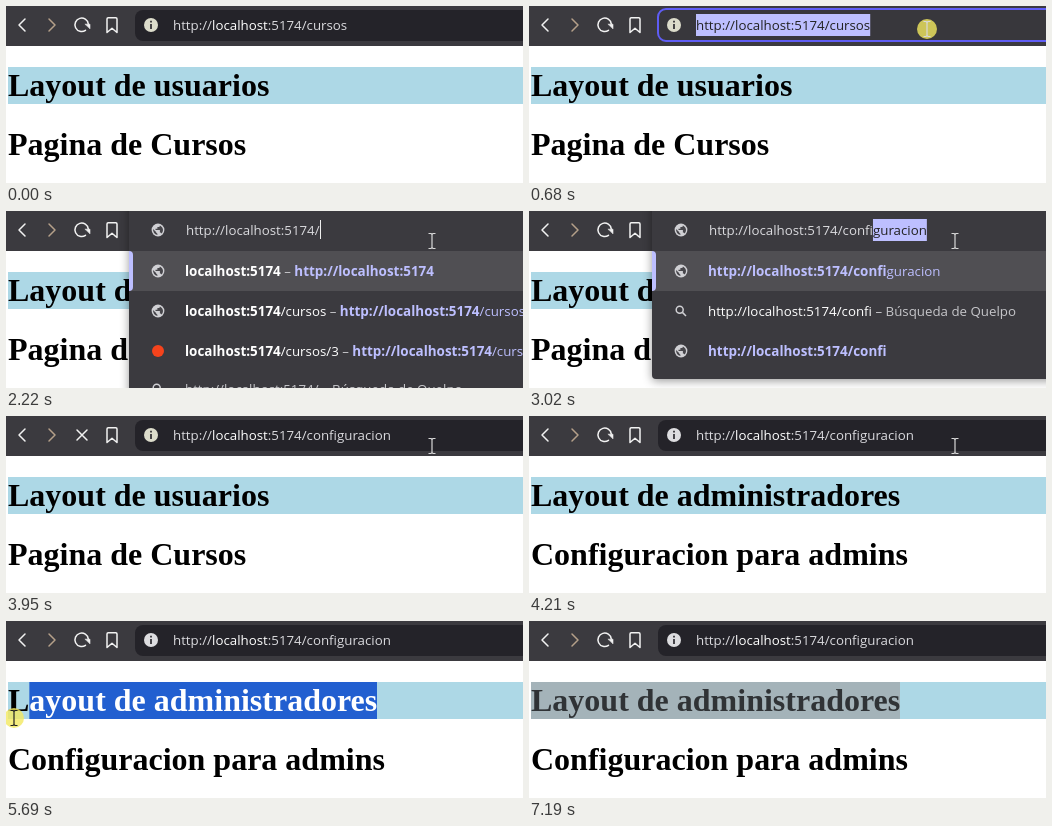
These frames come from a looping animation (517 px wide and 177 px high, 7.32 s). An HTML page:

```html
<!DOCTYPE html>
<html lang="es">
<head>
<meta charset="utf-8">
<title>Layouts por ruta</title>
<style>
  html, body { margin: 0; width: 100%; height: 100%; overflow: hidden; background: #fff; }
  svg { display: block; width: 100%; height: 100%; }
  text { white-space: pre; }
  .ui { font: 13.3px "Open Sans", "Noto Sans", sans-serif; fill: #c6c6ca; }
  .page { font: bold 32px "Liberation Serif", serif; fill: #000; }
  .bold { font-weight: 700; font-size: 13.45px; }
  .white { fill: #fff; }
  .link { fill: #bdbfff; }
  .line { fill: none; stroke: #f2f2f2; stroke-width: 1.5; stroke-linecap: round; stroke-linejoin: round; }
  #url { fill: #dadade; }
  #panel { filter: drop-shadow(0 2px 5px rgba(0, 0, 0, .4)); }
</style>
</head>
<body>
<svg viewBox="0 0 517 177">
  <defs>
    <clipPath id="selClip"><rect id="selClipBox" y="61" width="0" height="37"/></clipPath>
    <g id="globe">
      <circle r="6.4" fill="#d0d0d4"/>
      <path d="M-5 -1.100 L-1.900 1.900 V2.500 L-.6 3.800 V5 Q-5 4 -5 -1.100 Z M3.700 3.400 L2.500 2.500 H1.900 V0 H-2.500 V-1.300 H-.6 V-3.100 H.6 Q1.900 -3.100 1.900 -4.600 Q5 -3 5 0 Q5 2 3.700 3.400 Z" fill="#47464b"/>
    </g>
    <g id="lens" fill="none" stroke="#d0d0d4" stroke-width="1.5">
      <circle cx="-1.3" cy="-1.3" r="3.5"/><path d="M1.400 1.400 L5 5"/>
    </g>
    <circle id="dot" r="6" fill="#f5431c"/>
  </defs>

  <rect width="517" height="177" fill="#fff"/>
  <rect x="2" y="61" width="515" height="37" fill="#add8e6"/>
  <text id="title" class="page" x="2" y="90"></text>
  <rect id="sel" y="61" width="0" height="37"/>
  <text id="titleSel" class="page" x="2" y="90" clip-path="url(#selClip)"></text>
  <text id="heading" class="page" x="2" y="149"></text>

  <rect width="517" height="40" fill="#3b3a3f"/>
  <g class="line">
    <path d="M19 13 L13 19 L19 25"/>
    <path d="M43 13 L49 19 L43 25" stroke="#b5a08a"/>
    <g id="reload">
      <path d="M79.500 24.300 A6.700 6.700 0 1 1 82.300 18"/>
      <path d="M79.300 18.200 H84 V22.500 Z" fill="#f2f2f2" stroke-width=".6"/>
    </g>
    <path id="stop" d="M71 14 L81 24 M81 14 L71 24"/>
    <path d="M101 13 Q101 11.800 102.200 11.800 H109.800 Q111 11.800 111 13 V26.500 L106 22.300 L101 26.500 Z"/>
  </g>
  <rect id="field" x="129" width="400" rx="8"/>

  <g id="panel">
    <rect id="sheet" x="123" y="-10" width="410" rx="4" fill="#3b3a3f"/>
    <rect x="123" y="40" width="410" height="40" fill="#504f53"/>
    <path d="M123 40 Q127 40 127 44 V76 Q127 80 123 80 Z" fill="#bdbfff"/>
    <g id="rows"></g>
    <use href="#globe" x="152" y="19"/>
  </g>

  <g id="info">
    <circle id="infoDisc" cx="145" cy="19" r="7"/>
    <path d="M145 18 V23 M145 14.800 V16.400" stroke="#2b2a2e" stroke-width="1.7"/>
  </g>
  <rect id="mark" y="8" height="22" fill="#bdbfff"/>
  <text id="url" class="ui" y="24"><tspan id="scheme">http://</tspan><tspan id="host">localhost</tspan><tspan id="path"></tspan><tspan id="fill" fill="#222"></tspan></text>
  <rect id="caret" y="9" width="1" height="19" fill="#eee"/>

  <g id="cursor">
    <circle id="halo" r="10" fill="#f3e95f" fill-opacity=".8"/>
    <path id="beam" d="M-3.500 -7.500 H-1 L0 -6.500 L1 -7.500 H3.500 M0 -6.500 V6.500 M-3.500 7.500 H-1 L0 6.500 L1 7.500 H3.500" fill="none" stroke-width="1.2"/>
    <path id="arrow" d="M0 0 V16 L3.700 12.500 L6.200 18.200 L8.600 17.100 L6.100 11.600 H11.300 Z" fill="#fff" stroke="#000"/>
  </g>
</svg>
<script>
const LOOP = 7320, BASE = 'http://localhost:5174/';
const ui = Object.fromEntries([...document.querySelectorAll('svg [id]')].map(el => [el.id, el]));
const set = (el, attrs) => { for (const key in attrs) el.setAttribute(key, attrs[key]); };
const show = (el, on) => { el.style.display = on ? '' : 'none'; };
const write = (el, text) => { if (el.textContent !== text) el.textContent = text; };
const within = (t, from, to) => t >= from && t < to;

const typing = [[0, 'cursos'], [2140, ''], [2490, 'c'], [2620, 'co'], [2760, 'con'],
  [2890, 'conf'], [3020, 'confi'], [3620, 'configuracion']];

// start, end, steps, from, to: the pointer is sampled, so it moves in hops
const glides = [
  [70, 610, 8, [464, 166], [398, 23]],
  [740, 880, 2, [398, 23], [426, 30]],
  [4870, 5140, 4, [426, 30], [375, 96]],
  [5280, 5690, 6, [375, 96], [8, 97]],
  [5820, 6580, 11, [8, 97], [459, 164]]
];
const DRAG = glides[3];

function along([start, end, steps, a, b], t, lag = 0) {
  const hop = Math.floor((t - start) / (end - start) * steps + 0.01) - lag;
  const p = Math.max(0, Math.min(1, hop / steps));
  const eased = p * (2 - p);
  return a.map((v, i) => v + (b[i] - v) * eased);
}

const span = (cls, text) => `<tspan class="${cls}">${text}</tspan>`;
const dash = ' – ';

function suggestions(typed, rest) {
  const host = span('bold white', 'localhost:5174');
  const link = span('bold link', 'http://localhost:5174');
  const search = span('white', BASE + typed) + dash + 'Búsqueda de Quelpo';
  const page = path => host + span('white', path) + dash + link + span('link', path);
  if (!typed) return [
    ['globe', 60, host + dash + link],
    ['globe', 100, page('/cursos')],
    ['dot', 140, page('/cursos/3')],
    ['lens', 178, BASE + dash + 'Búsqueda de Quelpo']
  ];
  return [
    ['globe', 60, span('bold link', BASE + typed) + span('link', rest)],
    ['lens', 100, search],
    ['globe', 140, span('bold link', BASE + typed)]
  ];
}

let shownRows = null;
function drawRows(typed, rest) {
  if (shownRows === typed) return;
  shownRows = typed;
  ui.rows.innerHTML = suggestions(typed, rest).map(([icon, y, text]) =>
    `<use href="#${icon}" x="152" y="${y}"/><text class="ui" x="179" y="${y + 5}">${text}</text>`).join('');
  set(ui.sheet, { height: typed ? 178 : 218 });
}

function drawAddress(t) {
  const typed = typing.filter(([at]) => t >= at).pop()[1];
  const open = within(t, 2140, 3620);
  const focused = within(t, 610, 2140);
  const allMarked = within(t, 610, 1080);
  const editing = within(t, 610, 3950);
  const rest = !open || !typed ? '' : typed === 'c' ? 'ursos' : 'configuracion'.slice(typed.length);
  const left = open ? 180 : 167;

  show(ui.panel, open);
  if (open) drawRows(typed, rest);
  show(ui.field, !within(t, 2140, 3950));
  set(ui.field, focused
    ? { y: 3, height: 32, fill: '#38373c', stroke: '#5f5df5', 'stroke-width': 2 }
    : { y: 4, height: 31, fill: '#242329', stroke: 'none' });

  set(ui.url, { x: left });
  write(ui.path, ':5174/' + typed);
  write(ui.fill, rest);
  ui.host.style.fill = editing ? '' : '#fff';
  ui.url.style.fill = allMarked ? '#222' : '';

  const full = ui.url.getComputedTextLength();
  const tail = rest ? ui.fill.getComputedTextLength() : 0;
  const width = allMarked ? full : tail;
  set(ui.mark, { x: left + full - width, width });
  set(ui.caret, { x: Math.round(left + full) });
  show(ui.caret, within(t, 1080, 1620) || within(t, 2140, 2490));

  show(ui.info, !open);
  set(ui.infoDisc, { fill: t < 4210 ? '#dcdccb' : '#dddde0' });
  const loading = within(t, 3950, 4210);
  show(ui.reload, !loading);
  show(ui.stop, loading);
}

function selectionStart(t) {
  if (t >= 5750) return 2;
  const x = along(DRAG, t, 1)[0];
  let best = 371;
  for (let i = 0; i < ui.title.getNumberOfChars(); i++) {
    const edge = ui.title.getStartPositionOfChar(i).x;
    if (Math.abs(edge - x) < Math.abs(best - x)) best = edge;
  }
  return best;
}

function drawPage(t) {
  const admin = t >= 4210;
  const title = admin ? 'Layout de administradores' : 'Layout de usuarios';
  write(ui.title, title);
  write(ui.titleSel, title);
  write(ui.heading, admin ? 'Configuracion para admins' : 'Pagina de Cursos');

  const selecting = t >= DRAG[0];
  show(ui.sel, selecting);
  show(ui.titleSel, selecting);
  if (!selecting) return;
  const x = selectionStart(t);
  const box = { x, width: Math.max(0, 371 - x) };
  const inactive = t >= 7190;
  set(ui.sel, { ...box, fill: inactive ? '#a4b3b9' : '#225fd0' });
  set(ui.selClipBox, box);
  ui.titleSel.style.fill = inactive ? '#303336' : '#fff';
}

function drawCursor(t) {
  const visible = within(t, 70, 6720);
  show(ui.cursor, visible);
  if (!visible) return;
  const [x, y] = along(glides.filter(g => t >= g[0]).pop(), t);
  const overBar = y < 40;
  const beam = overBar || within(t, 5140, 5890) || (y > 61 && y < 98 && x < 375);
  set(ui.cursor, { transform: `translate(${Math.round(x)} ${Math.round(y)})` });
  show(ui.beam, beam);
  show(ui.arrow, !beam);
  set(ui.beam, { stroke: overBar ? '#d8d8d8' : '#222' });
  show(ui.halo, within(t, 610, 740) || within(t, 1080, 1210) || within(t, 5280, 5890));
}

const began = performance.now();
function frame() {
  const t = (performance.now() - began) % LOOP;
  drawPage(t);
  drawAddress(t);
  drawCursor(t);
  requestAnimationFrame(frame);
}
frame();
</script>
</body>
</html>
```
